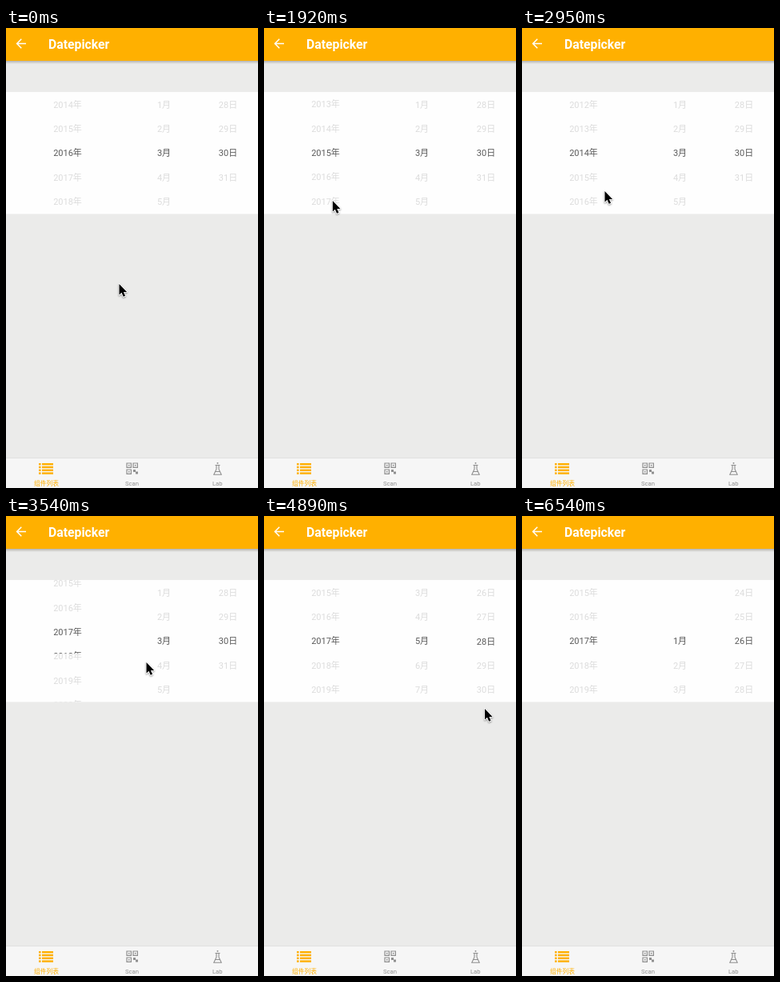
An HTML page with a canvas that plays this animation: 315x575 px, repeating every 8030 ms.

```html
<!DOCTYPE html>
<html lang="zh">
<head>
<meta charset="utf-8">
<title>Datepicker</title>
<style>
  html, body { margin: 0; width: 100%; height: 100%; overflow: hidden; background: #ebebea; }
  canvas { display: block; width: 315px; height: 575px; }
</style>
</head>
<body>
<canvas></canvas>
<script>
const W = 315, H = 575, LOOP = 8030, STEP = 148;
const TOP = 80, BOTTOM = 232.4, MIDDLE = 156.3, ROW = 30.4;
const BAND_TOP = 140, BAND_BOTTOM = 172;
const ORANGE = '#ffb000', GRAY = '#8f8f8f';
const FONT = 'Roboto, "Noto Sans CJK SC", "Noto Sans CJK", sans-serif';

const years = { x: 77, unit: '年', min: 1900, max: 2100, start: 2016 };
const months = { x: 197.5, unit: '月', min: 1, max: 12, start: 3 };
const days = { x: 277.5, unit: '日', min: 1, max: 31, start: 30 };

// Pointer script. Durations are in steps; a dragged column follows the pointer,
// then settles on a value.
const moves = [];
let pen = { end: 0, x: 142, y: 320 };

function moveTo(duration, x, y, drag = {}) {
  const move = { from: pen, begin: pen.end, end: pen.end + duration, x, y, ...drag };
  moves.push(move);
  pen = move;
}
function wait(duration) {
  moveTo(duration, pen.x, pen.y);
}
function drag(column, duration, x, y, value, settle = 1) {
  moveTo(duration, x, y, { column, value, settle });
}

moveTo(6, 58, 165);
moveTo(2, 78, 123);
moveTo(2, 79, 186);
wait(1);
drag(years, 3, 90, 231, 2014, 6);
moveTo(4, 105, 85);
moveTo(2, 104, 204);
wait(1);
drag(years, 2, 112, 90, 2017, 2);
moveTo(1, 176, 183);
moveTo(2, 205, 174);
drag(months, 3, 211, 126, 5);
moveTo(3, 276, 180);
drag(days, 2, 277, 302, 26);
moveTo(3, 188, 153);
wait(1);
drag(months, 1, 195, 275, 1);
moveTo(4, 276, 494);

const lerp = (a, b, p) => a + (b - a) * p;
const progress = (step, begin, length) => Math.min(1, Math.max(0, (step - begin) / length));

function pointerAt(step) {
  const { from, begin, end, x, y } = moves.find(move => step <= move.end);
  const p = progress(step, begin, end - begin);
  return { x: lerp(from.x, x, p), y: lerp(from.y, y, p) };
}

function valueAt(column, step) {
  let value = column.start;
  for (const move of moves) {
    if (move.column !== column || step < move.begin) continue;
    const dragged = progress(step, move.begin, move.end - move.begin);
    const released = value - (move.y - move.from.y) * dragged / ROW;
    value = lerp(released, move.value, progress(step, move.end, move.settle));
  }
  return value;
}

const canvas = document.querySelector('canvas');
const ctx = canvas.getContext('2d');
const ratio = window.devicePixelRatio || 1;
canvas.width = W * ratio;
canvas.height = H * ratio;

function rect(x, y, w, h, color) {
  ctx.fillStyle = color;
  ctx.fillRect(x, y, w, h);
}

function text(str, x, y, size, color, align = 'center', weight = 400) {
  ctx.font = `${weight} ${size}px ${FONT}`;
  ctx.textAlign = align;
  ctx.fillStyle = color;
  ctx.fillText(str, x, y);
}

function stroke(path, color, width) {
  ctx.strokeStyle = color;
  ctx.lineWidth = width;
  ctx.stroke(new Path2D(path));
}

function drawHeader() {
  const shade = ctx.createLinearGradient(0, 41, 0, 45);
  shade.addColorStop(0, 'rgba(0,0,0,.24)');
  shade.addColorStop(1, 'rgba(0,0,0,0)');
  rect(0, 41, W, 4, shade);
  rect(0, 0, W, 41, ORANGE);
  stroke('M25 19.5H13.8M19.3 13.8L13.6 19.5L19.3 25.2', '#fff', 1.5);
  text('Datepicker', 53, 25.5, 15.75, '#fff', 'left', 700);
}

function drawRows(step, top, bottom, color) {
  ctx.save();
  ctx.beginPath();
  ctx.rect(0, top, W, bottom - top);
  ctx.clip();
  for (const column of [years, months, days]) {
    const value = valueAt(column, step);
    const last = Math.min(column.max, Math.ceil(value) + 3);
    for (let n = Math.max(column.min, Math.floor(value) - 3); n <= last; n++)
      text(n + column.unit, column.x, MIDDLE + (n - value) * ROW + 4, 11, color);
  }
  ctx.restore();
}

function drawPicker(step) {
  const faint = '#dcdcdc';
  rect(0, TOP, W, BOTTOM - TOP, '#fefefe');
  drawRows(step, TOP, BAND_TOP, faint);
  drawRows(step, BAND_BOTTOM, BOTTOM, faint);
  drawRows(step, BAND_TOP, BAND_BOTTOM, '#5a5a5a');
}

function drawTabs() {
  rect(0, 537, W, 38, '#f6f6f6');
  rect(0, 537, W, 1, '#e0e0e0');

  for (let i = 0; i < 4; i++) {
    const y = 544 + i * 3.8;
    rect(41, y, 2.6, 2.4, ORANGE);
    rect(45, y, 14, 2.4, ORANGE);
  }

  for (let i = 0; i < 3; i++) {
    const x = 151 + i % 2 * 8, y = 544 + (i >> 1) * 8;
    stroke(`M${x} ${y}h5.4v5.4h-5.4z`, GRAY, 1.2);
    rect(x + 1.9, y + 1.9, 1.6, 1.6, GRAY);
  }
  rect(159, 552, 3, 3, GRAY);
  rect(162, 554.5, 3, 3, GRAY);

  stroke('M261.5 546.5H267.5M263 547V551.5L259.8 558.3H269.2L266 551.5V547M261.5 554.5H267.5', GRAY, 1.1);
  rect(263.7, 543, 1.6, 1.8, GRAY);

  text('组件列表', 50.5, 572, 7.75, ORANGE);
  text('Scan', 157.5, 572, 7.7, GRAY);
  text('Lab', 264.3, 572, 7.7, GRAY);
}

function drawPointer(step) {
  if (step > pen.end) return;
  const { x, y } = pointerAt(step);
  const arrow = new Path2D('M0 0V13.6L3 10.8L5.2 15.8L7.6 14.8L5.4 9.9H9.6Z');
  ctx.save();
  ctx.translate(x - .5, y);
  ctx.lineJoin = 'round';
  ctx.shadowColor = 'rgba(0,0,0,.4)';
  ctx.shadowBlur = 2 * ratio;
  ctx.shadowOffsetY = ratio;
  ctx.strokeStyle = '#fff';
  ctx.lineWidth = 1.8;
  ctx.stroke(arrow);
  ctx.shadowColor = 'transparent';
  ctx.fillStyle = '#000';
  ctx.fill(arrow);
  ctx.restore();
}

function render() {
  // The picture advances in whole steps, like a screen recording.
  const step = Math.floor((performance.now() % LOOP + 18) / STEP);
  ctx.setTransform(ratio, 0, 0, ratio, 0, 0);
  rect(0, 0, W, H, '#ebebea');
  drawHeader();
  drawPicker(step);
  drawTabs();
  drawPointer(step);
  requestAnimationFrame(render);
}
render();
</script>
</body>
</html>
```
